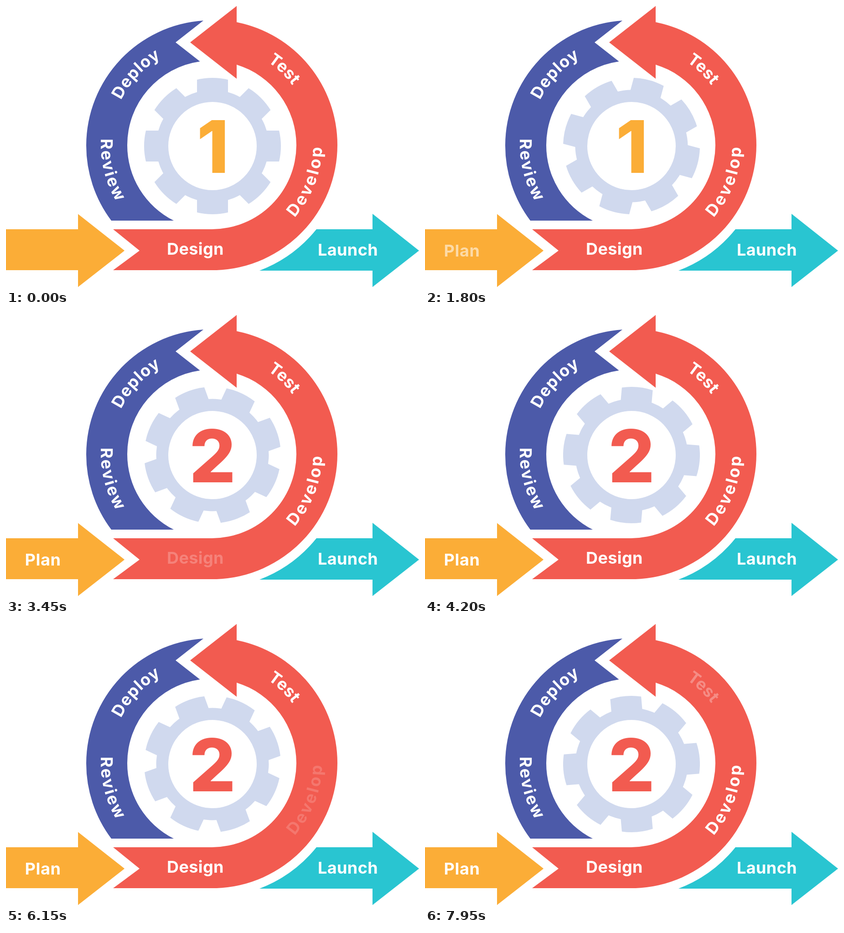
An HTML page for the animation above (8000 ms loop, 906x618 px).

```html
<!DOCTYPE html>
<html lang="en">
<head>
<meta charset="utf-8">
<title>Agile cycle</title>
<style>
  html, body { margin: 0; width: 100%; height: 100%; overflow: hidden; background: #fff; }
  svg { display: block; width: 100%; height: 100%; }
  .label { font: 700 36px Inter, "Open Sans", sans-serif; fill: #fff; }
  .digit { font: 800 160px Inter, "Open Sans", sans-serif; }
</style>
</head>
<body>
<svg viewBox="0 0 906 618" xmlns="http://www.w3.org/2000/svg">
  <defs>
    <path id="tooth" d="M-34-115V-146.1A150 150 0 0 1 34-146.1V-115Z"/>
    <path id="deployArc"/>
    <path id="reviewArc"/>
    <path id="developArc"/>
    <path id="testArc"/>
  </defs>

  <path fill="#4c5aa9" d="M433 32A275.500 275.500 0 0 0 176 306A275.500 275.500 0 0 0 231 472H368A185.500 185.500 0 0 1 266 306A185.500 185.500 0 0 1 425.500 122L372 80Z"/>
  <path fill="#f25b50" d="M506 0L404 80L506 160V129A185.500 185.500 0 0 1 637 306A185.500 185.500 0 0 1 452 491H235L293 538L235 581H462A275.500 275.500 0 0 0 727 306A275.500 275.500 0 0 0 506 35.500Z"/>
  <path fill="#29c5d1" d="M681 491H804V457L906 538L804 618V582H556A295 295 0 0 0 681 491Z"/>
  <path fill="#fbad37" d="M0 491H158V457.500L260 538L158 618V581H0Z"/>

  <g id="gear" fill="#d0d9ee">
    <circle r="110.25" fill="none" stroke="#d0d9ee" stroke-width="26.5"/>
  </g>

  <text id="one" class="digit" y="367" fill="#fbad37">1</text>
  <text id="two" class="digit" y="368" fill="#f25b50">2</text>

  <text id="plan" class="label" x="41.5" y="551" letter-spacing="0.7">Plan</text>
  <text id="design" class="label" x="353" y="547" letter-spacing="0.4">Design</text>
  <text class="label" x="684" y="549" letter-spacing="0.4">Launch</text>
  <text class="label" letter-spacing="1.3"><textPath href="#deployArc">Deploy</textPath></text>
  <text class="label" letter-spacing="3.6"><textPath href="#reviewArc">Review</textPath></text>
  <text id="develop" class="label" letter-spacing="4.3"><textPath href="#developArc">Develop</textPath></text>
  <text id="test" class="label"><textPath href="#testArc">Test</textPath></text>
</svg>
<script>
  const LOOP = 8000, STEP = 150;
  const CENTER = { x: 451.5, y: 305.5 };
  const GEAR = { x: 453, y: 308 };
  const el = id => document.getElementById(id);

  // Angles in degrees, clockwise from the right.
  function setArc(id, r, from, to) {
    const point = deg => {
      const a = deg * Math.PI / 180;
      return `${CENTER.x + r * Math.cos(a)} ${CENTER.y + r * Math.sin(a)}`;
    };
    el(id).setAttribute("d", `M${point(from)}A${r} ${r} 0 0 ${to > from ? 1 : 0} ${point(to)}`);
  }

  setArc("deployArc", 222, 206.3, 300);
  setArc("reviewArc", 243.5, 183.2, 100);
  setArc("developArc", 242, 41.4, -40);
  setArc("testArc", 220, -56.3, 20);

  const gear = el("gear");
  for (let i = 0; i < 8; i++) {
    const tooth = document.createElementNS("http://www.w3.org/2000/svg", "use");
    tooth.setAttribute("href", "#tooth");
    tooth.setAttribute("transform", `rotate(${i * 45})`);
    gear.append(tooth);
  }

  // Centre the visible part of each digit in the gear.
  const pen = document.createElement("canvas").getContext("2d");
  for (const digit of [el("one"), el("two")]) {
    pen.font = '800 160px Inter, "Open Sans", sans-serif';
    const ink = pen.measureText(digit.textContent);
    digit.setAttribute("x", GEAR.x - (ink.actualBoundingBoxRight - ink.actualBoundingBoxLeft) / 2);
  }

  // Start of each label's pulse, in steps.
  const pulses = [["plan", 0], ["design", 14.2], ["develop", 30.4], ["test", 44.5]];

  // Fade in, out, and in again; fully visible outside the pulse.
  function pulse(u) {
    if (u < 0 || u >= 13.6) return 1;
    if (u < 5) return u / 5;
    if (u < 10) return 2 - u / 5;
    return (u - 10) / 3.6;
  }

  function draw(time) {
    const step = Math.floor(time / STEP);
    gear.setAttribute("transform", `translate(${GEAR.x} ${GEAR.y}) rotate(${step * 5})`);
    for (const [id, start] of pulses) el(id).setAttribute("opacity", pulse(step - start));
    const second = step >= 15;
    el("one").setAttribute("visibility", second ? "hidden" : "visible");
    el("two").setAttribute("visibility", second ? "visible" : "hidden");
  }

  const began = performance.now();
  function tick() {
    draw((performance.now() - began) % LOOP);
    requestAnimationFrame(tick);
  }
  tick();
</script>
</body>
</html>
```
